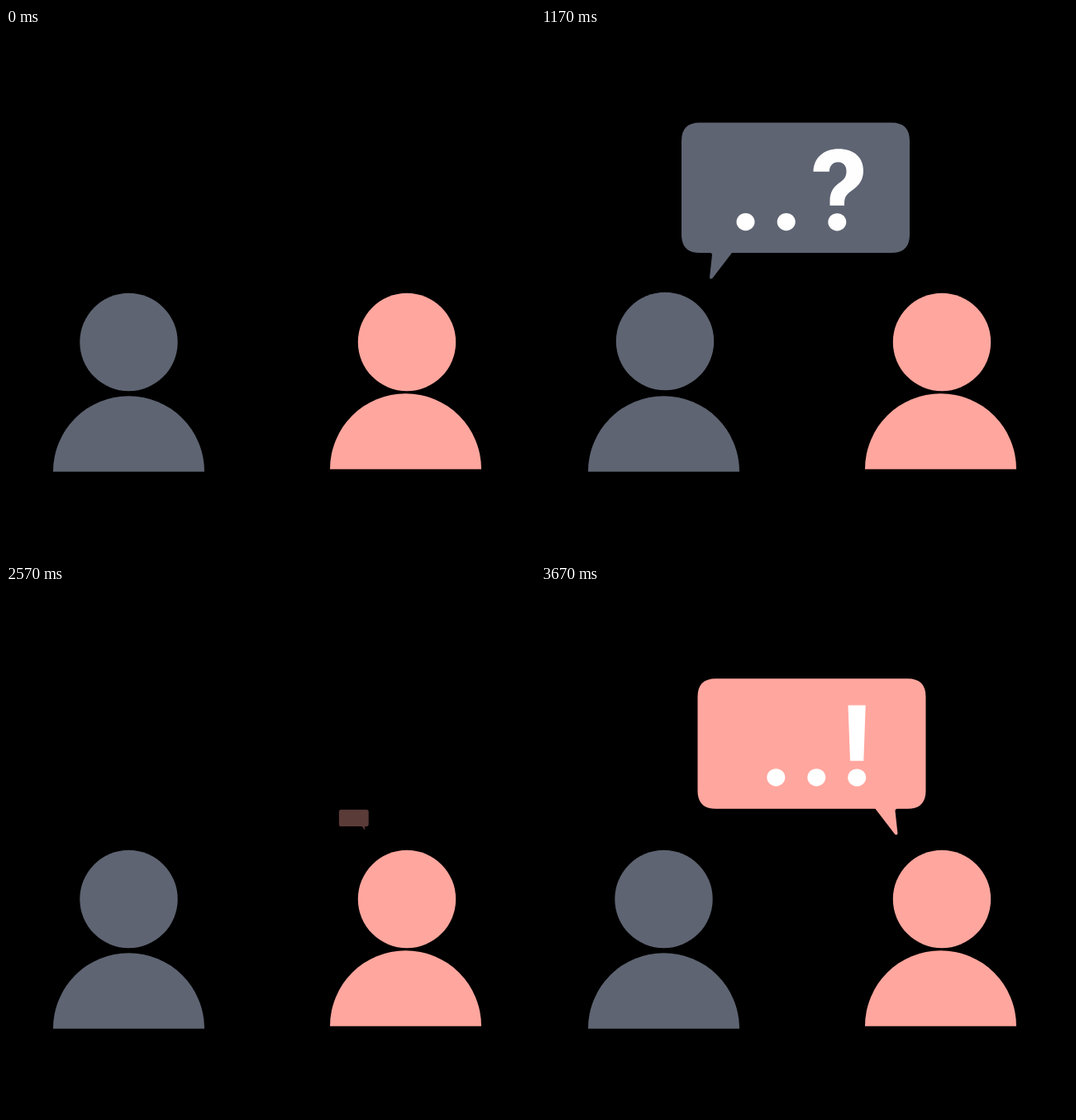
Animation of 640x640 px, one loop 4.83 s. Source, as an HTML page:

```html
<!DOCTYPE html>
<html lang="en">
<head>
<meta charset="utf-8">
<title>Conversation</title>
<style>
  html, body { margin: 0; width: 100%; height: 100%; overflow: hidden; background: #000; }
  svg { display: block; width: 100%; height: 100%; }
  .asker { fill: #5e6472; }
  .answerer { fill: #ffa69e; }
  .mark { fill: #fff; }
</style>
</head>
<body>
<svg viewBox="0 0 640 640">
  <defs>
    <path id="bubble" d="M192 114.5H424Q446 114.5 446 136.5V250Q446 272 424 272H231L208 302Q205.500 305 204 302L207 274.500Q207 272 204.500 272H192Q170 272 170 250V136.500Q170 114.500 192 114.500Z"/>
    <ellipse id="dot" rx="11" ry="10.6"/>
  </defs>

  <path class="asker" d="M57 536.700A91.500 91.500 0 0 1 240 536.700Z"/>
  <circle class="asker" id="askerHead" cx="148.500" cy="380" r="59.200"/>
  <path class="answerer" d="M392 533.700A91.500 91.500 0 0 1 575 533.700Z"/>
  <circle class="answerer" id="answererHead" cx="485" cy="380" r="59.200"/>

  <g id="question">
    <g class="asker" id="questionBubble"><use href="#bubble"/></g>
    <g class="mark">
      <g id="questionDot1"><use href="#dot" x="247.500" y="234.600"/></g>
      <g id="questionDot2"><use href="#dot" x="296.700" y="234.600"/></g>
      <g id="questionMark">
        <path d="M329.500 173.500C330 156 343 146 360 146C378 146 390 155.500 390 172.500C390 184 384 191 376 196.500C370 200.500 367 204.500 367 211V214.500H349.500V209C349.500 198 354 192 361 187C367 183 369.500 179.500 369.500 173C369.500 166 365.500 162 359.500 162C353 162 349 166.500 348.800 173.500Z"/>
        <use href="#dot" x="358.300" y="234.600"/>
      </g>
    </g>
  </g>

  <g id="answer">
    <g class="answerer" id="answerBubble"><use href="#bubble" transform="translate(635.500 -1.200) scale(-1 1)"/></g>
    <g class="mark">
      <g id="answerDot1"><use href="#dot" x="284.300" y="232.800"/></g>
      <g id="answerDot2"><use href="#dot" x="333.300" y="232.800"/></g>
      <g id="answerMark">
        <path d="M371.500 145.500H392.700L390.300 212.800H374Z"/>
        <use href="#dot" x="382.200" y="233"/>
      </g>
    </g>
  </g>
</svg>
<script>
const LOOP = 4830;
const PEAK = 1.18;
const RISE = 92;

const el = id => document.getElementById(id);
const progress = (t, from, to) => Math.min(1, Math.max(0, (t - from) / (to - from)));
const smooth = p => p * p * (3 - 2 * p);
const easeOut = p => 1 - (1 - p) ** 2;

// Motion is stepped at 25 poses per second, shown on a 30 Hz clock.
function poseAt(ms) {
  const tick = Math.floor((ms + 4) * 0.03);
  return Math.floor((tick * 5 + 2) / 6);
}

function place(id, x, y, opacity = 1) {
  el(id).setAttribute("transform", `translate(${x} ${y})`);
  el(id).setAttribute("opacity", opacity);
}

function popBubble(id, t, [start, peak, end], x, y) {
  const scale = PEAK * smooth(progress(t, start, peak))
    - (PEAK - 1) * smooth(progress(t, peak, end));
  el(id).setAttribute("transform",
    `translate(${x} ${y}) scale(${scale}) translate(${-x} ${-y})`);
  el(id).setAttribute("opacity", progress(t, start, start + 3.7));
}

function rise(id, t, start, end, ease = smooth) {
  const p = ease(progress(t, start, end));
  place(id, 0, RISE * (1 - p), p);
}

// Each key is [time, x, y].
function moveHead(id, t, keys) {
  const next = keys.findIndex(key => key[0] > t);
  if (next < 1) return place(id, 0, 0);
  const [a, b] = [keys[next - 1], keys[next]];
  const p = progress(t, a[0], b[0]);
  place(id, a[1] + (b[1] - a[1]) * p, a[2] + (b[2] - a[2]) * p);
}

const nod = start => [[start, 0, 0], [start + 2, 0, -4], [start + 4, 0, 4], [start + 6, 0, 0]];

const askerMoves = [
  [21, 0, 0], [22, 0, -1], [24, -4, 0], [26, 0, 4], [28, 3, -2], [30, 0, 0], ...nod(33)
];
const answererMoves = [
  [71, 0, 0], [72, -2.7, -1.6], [74, -4, 1], [77, 1, 4], [80, 4, 0], [81.5, 2, -3], [83, 0, 0],
  ...nod(86)
];

function draw(ms) {
  const t = poseAt(ms);

  popBubble("questionBubble", t, [0, 8, 13], 208, 299.7);
  rise("questionDot1", t, 15, 19);
  rise("questionDot2", t, 17.5, 21.8);
  rise("questionMark", t, 20, 29.5, easeOut);
  el("question").setAttribute("opacity", 1 - progress(t, 54, 57));

  popBubble("answerBubble", t, [62.7, 69, 72.3], 434.7, 295.3);
  rise("answerDot1", t, 66, 71.5);
  rise("answerDot2", t, 70.5, 76);
  rise("answerMark", t, 74, 82.5, easeOut);

  moveHead("askerHead", t, askerMoves);
  moveHead("answererHead", t, answererMoves);
}

const startTime = performance.now();
function tick() {
  draw((performance.now() - startTime) % LOOP);
  requestAnimationFrame(tick);
}
tick();
</script>
</body>
</html>
```
